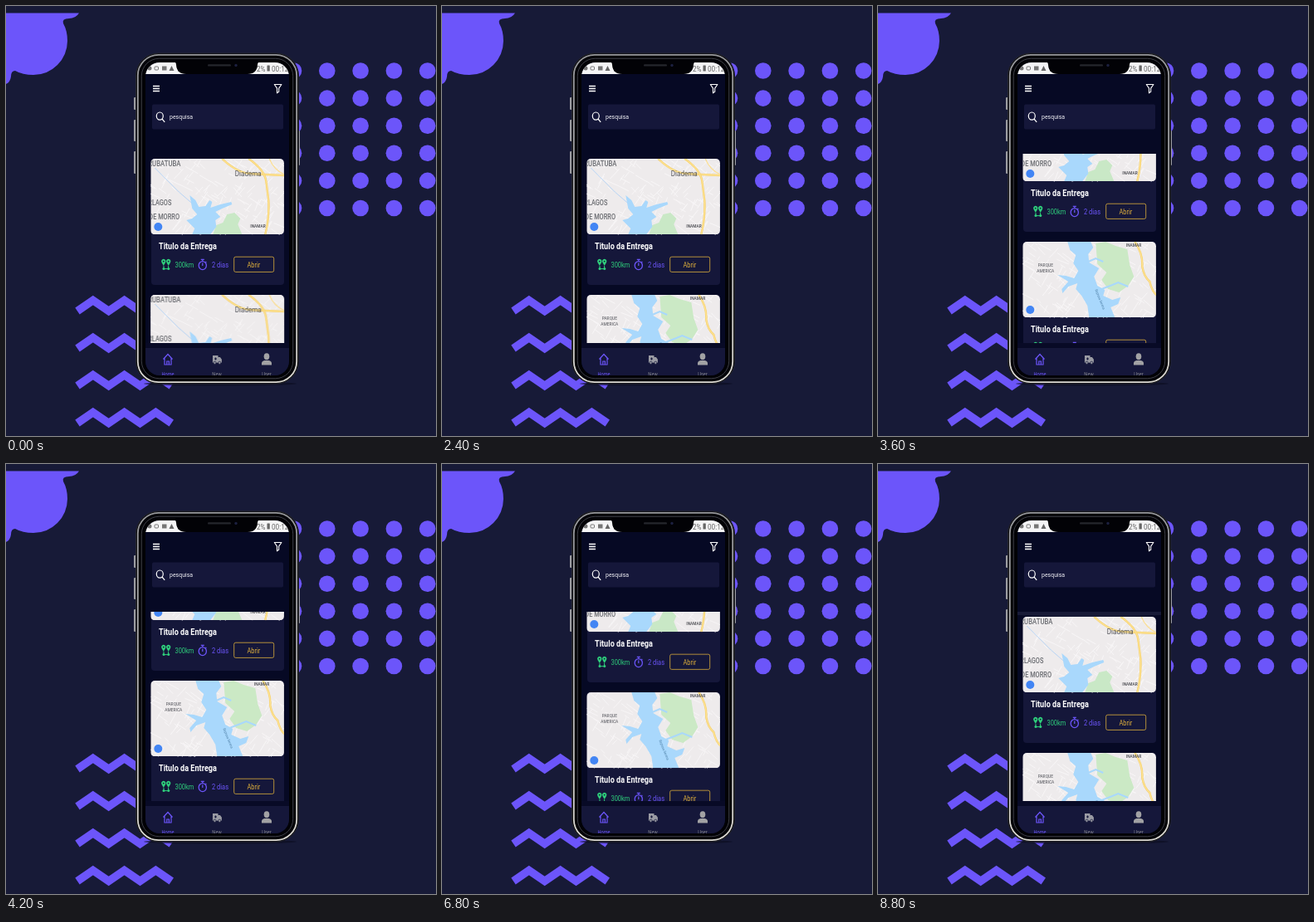
Recreate the animation shown at these times as an HTML page. Size 518 by 518 pixels, loop 8.9 s.

```html
<!DOCTYPE html>
<html lang="pt">
<head>
<meta charset="utf-8">
<title>Entregas</title>
<style>
  html, body { margin: 0; width: 100%; height: 100%; overflow: hidden; background: #171a37; }
  svg { display: block; width: 100%; height: 100%; }
  text { font-family: Roboto, "Open Sans", sans-serif; }
</style>
</head>
<body>
<svg id="stage" viewBox="0 0 518 518" xmlns="http://www.w3.org/2000/svg"></svg>
<script>
const LOOP = 8900;
const PURPLE = '#6c55fa', GREEN = '#2fcf7c', YELLOW = '#dfb03c', CARD = '#15173a', SCREEN = '#060924';

// Screen text is slightly condensed, like the rest of the screenshot.
const label = (x, y, size, fill, str, extra = '') =>
  `<text transform="translate(${x} ${y}) scale(.86 1)" font-size="${size}" fill="${fill}" ${extra}>${str}</text>`;
const line = (d, color, width, extra = '') =>
  `<path d="${d}" fill="none" stroke="${color}" stroke-width="${width}" ${extra}/>`;
const area = (d, color) => `<path d="${d}" fill="${color}"/>`;
const box = (x, y, w, h, r, fill, extra = '') =>
  `<rect x="${x}" y="${y}" width="${w}" height="${h}" rx="${r}" fill="${fill}" ${extra}/>`;
const range = n => [...Array(n).keys()];

function random(seed) {
  return () => (seed = seed * 16807 % 2147483647) / 2147483647;
}

function streets(seed) {
  const rnd = random(seed);
  let d = '';
  for (const i of range(150)) {
    const x = rnd() * 165 - 3, y = rnd() * 94 - 3;
    const a = (i % 2 ? 1.9 : .35) + rnd() * .5, len = 5 + rnd() * 14;
    d += `M${x.toFixed(1)} ${y.toFixed(1)}l${(Math.cos(a) * len).toFixed(1)} ${(Math.sin(a) * len).toFixed(1)}`;
  }
  return box(0, 0, 161, 91, 0, '#eeebec') + line(d, '#f8f6f7', 1);
}

const road = d => line(d, '#f5cd63', 2.4) + line(d, '#fde293', 1.4);
const badge = '<circle cx="9" cy="82" r="5" fill="#4285f4"/>';

const mapNorth = streets(71) +
  area('M92 67L101 65L108 72L105 79L110 91H75L79 80L87 77Z', '#c9e8c6') +
  line('M5 11L20 26L34 40L49 53', '#b7d4f5', 1) +
  area('M47 44L54 50L58 58L66 57L71 50L74 52L72 59L84 55L97 52L98 55L86 60L78 64L84 70L78 74L79 82L72 91H50L53 84L43 74L50 72L56 67L50 60Z', '#a9d8fc') +
  road('M86 0Q104 17 120 18T161 20') +
  road('M118 0Q137 13 139 27L142 50Q143 72 138 91') +
  line('M143 0Q148 13 161 19', '#fbdf94', 1.3) +
  label(-3, 9, 9, '#696b70', 'RUBATUBA', 'font-weight="500"') +
  label(101.5, 21, 9.4, '#505158', 'Diadema') +
  label(-3, 56, 8.6, '#696b70', 'RLAGOS', 'font-weight="500"') +
  label(-2, 73, 8.6, '#696b70', 'DE MORRO', 'font-weight="500"') +
  label(120, 83, 5.6, '#45464c', 'INAMAR', 'font-weight="500"') + badge;

const mapSouth = streets(907) +
  area('M88 2L100 0L112 5L126 9L129 28L134 42L127 53L116 61L103 57L95 46L101 37L90 27Z', '#cbe9c5') +
  area('M54 0H82L85 7L79 15L80 25L92 32L86 42L90 53L99 58L97 65L108 70L118 67L115 75L106 79L111 91H80L78 77L71 65L64 57L66 50L55 54L48 62L47 57L55 48L42 40L52 41L62 44L67 35L61 26L64 16L57 10Z', '#a9d8fc') +
  line('M95 57L108 52L115 49L127 54M79 24L88 20L97 24', '#a9d8fc', 2) +
  road('M135 0Q145 14 144 30Q146 42 153 48Q156 60 161 64') +
  label(124.5, 6, 5.6, '#45464c', 'INAMAR', 'font-weight="500"') +
  label(27.5, 30, 5.7, '#4d4e55', 'PARQUE', 'text-anchor="middle"') +
  label(27.5, 37, 5.7, '#4d4e55', 'AMERICA', 'text-anchor="middle"') +
  `<g transform="translate(87 58) rotate(68)">${label(0, 0, 4.3, '#4d7fa6', 'Represa Serena')}</g>` + badge;

const pin = x => `<path d="M${x} 313l-2.3-4a2.7 2.7 0 1 1 4.6 0z" fill="${GREEN}"/><circle cx="${x}" cy="307.6" r=".9" fill="${CARD}"/>`;

const card = (dy, map) => `<g transform="translate(0 ${dy})">
  ${box(175, 184, 160, 152, 4, CARD)}
  <g transform="translate(174.3 184)" clip-path="url(#mapClip)">${map}</g>
  ${label(184, 293, 10.6, '#fff', 'Titulo da Entrega', 'font-weight="700"')}
  ${pin(189.8)}${pin(195.7)}
  ${line('M190 313v3.6h5.6v-3.6', GREEN, 1)}
  <circle cx="190" cy="316.6" r="1.5" fill="${GREEN}"/><circle cx="195.8" cy="316.6" r="1.5" fill="${GREEN}"/>
  ${label(203.5, 315, 8.6, GREEN, '300km')}
  <ellipse cx="236.8" cy="312.6" rx="4.6" ry="5" fill="none" stroke="${PURPLE}" stroke-width="1.3"/>
  ${line('M234.8 305.4h4M236.8 305.4v2.2M236.8 309.6v3.4M240.4 307.8l1 1', PURPLE, 1.2)}
  ${label(248, 315, 8.7, PURPLE, '2 dias')}
  ${box(274.7, 302.2, 48, 18.2, 2, 'none', `stroke="${YELLOW}" stroke-width=".8"`)}
  ${label(290.5, 315, 8.6, YELLOW, 'Abrir')}
</g>`;

const zigzag = y => line(`M86 ${y + 6.5}` + range(6).map(i => `L${104.8 + i * 18.9} ${y + (i % 2 ? 6.5 : -6.5)}`).join(''), PURPLE, 9.5);

const backdrop = box(0, 0, 518, 518, 0, '#171a37') +
  area('M0 8.5H88Q84 15 76 15Q67 15 69 21Q74 30 74 42A41 41 0 0 1 33 83Q20 83 11 78Q6 78 6 85Q5 92 0 94Z', PURPLE) +
  range(30).map(i => `<circle cx="${346.5 + i % 5 * 40.3}" cy="${78 + Math.floor(i / 5) * 33.1}" r="9.8" fill="${PURPLE}"/>`).join('') +
  range(4).map(i => zigzag(361 + i * 45)).join('');

const phone =
  '<ellipse cx="258" cy="455" rx="92" ry="2.5" fill="#0c0e22" opacity=".7"/>' +
  [[154, 110, 15], [154, 137, 26], [154, 175, 27], [351, 150, 42]].map(([x, y, h]) => box(x, y, 3, h, 1, '#9b9ca1')).join('') +
  box(156.5, 57, 196, 398, 27, '#050509', 'stroke="#24252c"') +
  box(158.8, 58.8, 191.4, 394.4, 25, 'none', 'stroke="url(#metal)" stroke-width="1.8"') +
  box(163.3, 63.3, 182.4, 385.4, 21, '#020206', 'stroke="#45464d" stroke-width=".9"');

const statusBar = box(167, 67, 176, 15, 0, '#f5f5f6') +
  '<circle cx="173" cy="75" r="2.5" fill="#777"/>' +
  box(179, 73, 4.5, 4, 1, 'none', 'stroke="#777"') + box(188, 72.5, 5.5, 5, 0, '#777') +
  area('M196.5 78l3-6 3 6z', '#666') + label(205, 78.5, 9, '#666', '1') +
  label(302, 78.7, 9.5, '#666', '2%') + box(314.5, 71.5, 3.3, 7, .5, '#666') +
  label(320, 78.7, 9.5, '#666', '00:12');

const header =
  line('M177 96.5h8M177 99.5h8M177 102.5h8', '#fff', 1.5) +
  line('M323.3 94.5h8.6l-3.2 4.6v4.2l-2.2 1.6v-5.8z', '#fff', 1.1, 'stroke-linejoin="round"') +
  box(176, 118.5, 158, 30, 2, CARD) +
  '<ellipse cx="185.3" cy="132.6" rx="4" ry="4.6" fill="none" stroke="#fff" stroke-width="1.2"/>' +
  line('M188 136l3.2 3.8', '#fff', 1.2) + label(197, 136, 8.1, '#f0f0f5', 'pesquisa');

const tabs = box(167, 406, 176, 6, 0, '#080a26') + box(167, 412, 176, 36, 0, CARD) +
  line('M189.5 425.5l5.5-6 5.5 6M191 424.5v7.5h8v-7.5M193.8 432v-4h2.6v4', PURPLE, 1.2) +
  area('M249 421h6.5v2h2.4l2 2.8v4h-11z', '#9a9ba3') +
  line('M251 425h3M252.5 423.5v3', CARD, 1) +
  [251.5, 257.3].map(x => `<circle cx="${x}" cy="429.8" r="1.6" fill="#9a9ba3" stroke="${CARD}" stroke-width=".7"/>`).join('') +
  '<ellipse cx="314" cy="422.2" rx="3.3" ry="4" fill="#a2a2a4"/>' +
  area('M308 432.5v-2q0-3 3.5-3.6h5q3.5 .6 3.5 3.6v2z', '#a2a2a4') +
  [[195, 'Home', PURPLE], [254, 'New', '#85868f'], [314, 'User', '#85868f']]
    .map(([x, s, c]) => label(x, 446, 6.6, c, s, 'text-anchor="middle"')).join('');

const notch =
  area('M201 67Q205 67 205 71Q206 82 217 82H291Q302 82 303 71Q303 67 307 67Z', '#020206') +
  box(243, 70.2, 28, 2.4, 1.2, '#25262c') + '<circle cx="277" cy="71.5" r="1.7" fill="#1c2040"/>';

document.getElementById('stage').innerHTML = `
<defs>
  <linearGradient id="metal" x2="0" y2="1">
    <stop stop-color="#96979a"/><stop offset=".5" stop-color="#b4b4b5"/><stop offset="1" stop-color="#dcdad3"/>
  </linearGradient>
  <clipPath id="mapClip"><rect width="160.6" height="91.5" rx="5"/></clipPath>
  <clipPath id="screenClip"><rect x="168" y="68" width="173" height="377" rx="17"/></clipPath>
  <clipPath id="listClip"><rect x="168" y="178" width="173" height="228"/></clipPath>
</defs>
${backdrop}${phone}
<g clip-path="url(#screenClip)">
  ${box(167, 67, 176, 380, 0, SCREEN)}${statusBar}${header}
  <g clip-path="url(#listClip)">
    <g id="list">
      ${card(0, mapNorth)}
      ${card(164, mapSouth + `<g id="loading">${mapNorth}</g>`)}
    </g>
    <path id="glow" d="M168 178H341V182Q254 186 168 182Z" fill="#444766" opacity="0"/>
  </g>
  ${tabs}
</g>
${notch}`;

// Each row: time in ms, value.
function play(id, prop, rows, toValue, easing = 'linear') {
  document.getElementById(id).animate(
    rows.map(([t, v]) => ({ offset: t / LOOP, [prop]: toValue(v), easing })),
    { duration: LOOP, iterations: Infinity });
}

play('list', 'transform', [
  [0, 0], [2400, 0], [2700, 13], [3100, 38], [3600, 64], [4200, 87], [4700, 100],
  [5700, 100], [6200, 91], [6800, 73], [7400, 42], [8000, 12], [8400, 0], [LOOP, 0]
], y => `translateY(${-y}px)`);
play('loading', 'opacity', [[0, 1], [500, 0], [LOOP, 0]], String, 'step-end');
play('glow', 'opacity', [[0, 0], [8400, 0], [8700, .3], [8899, .3], [LOOP, 0]], String);
</script>
</body>
</html>
```
